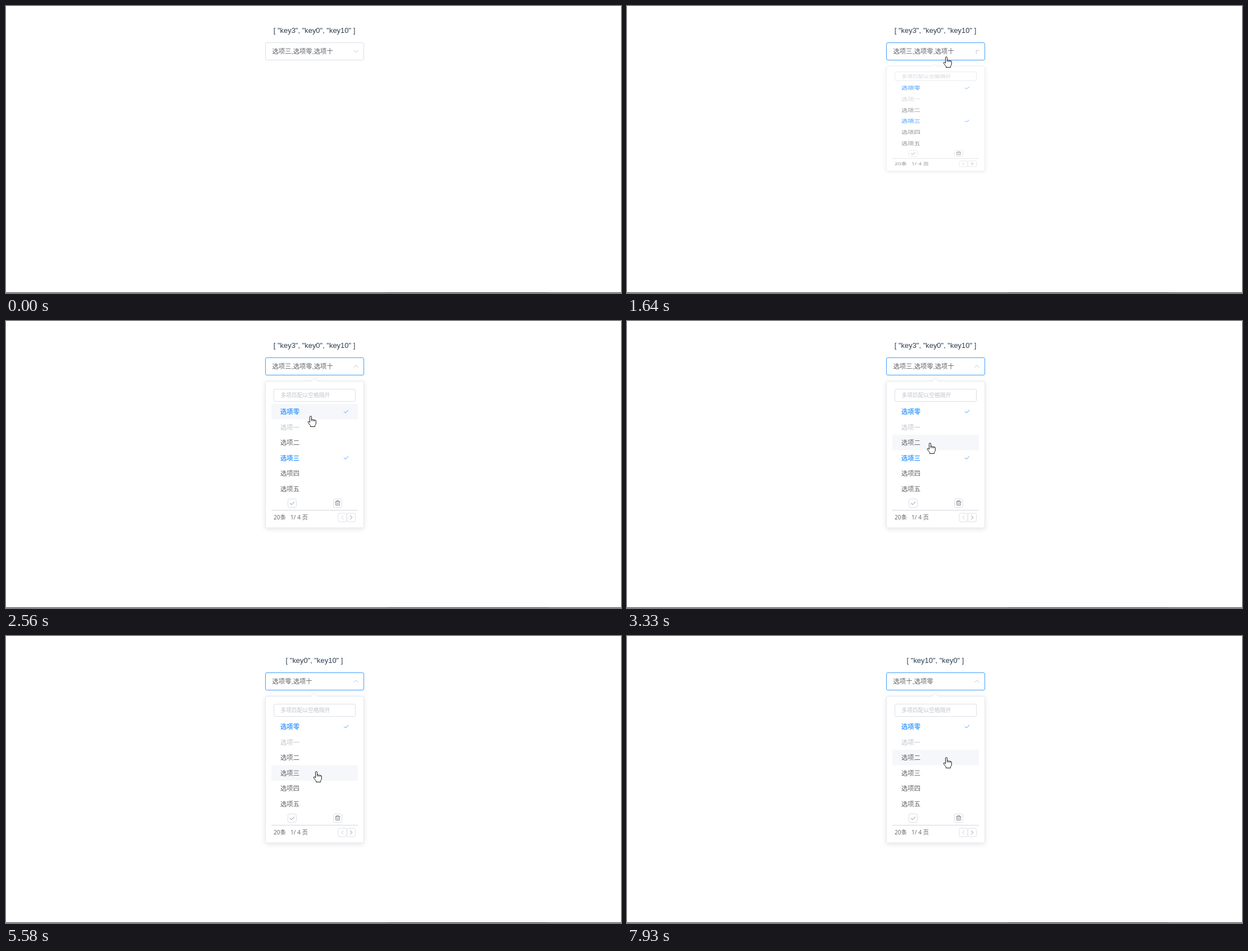
These frames come from a looping animation (1094x512 px, 7990 ms). An HTML page:

```html
<!DOCTYPE html>
<html lang="zh-CN">
<head>
<meta charset="utf-8">
<style>
html, body { margin: 0; width: 100%; height: 100%; overflow: hidden; background: #fff; }
svg { display: block; font: 11.33px Arial, "Liberation Sans", "Noto Sans CJK SC", "Noto Sans CJK", sans-serif; fill: #606266; }
path { fill: none; }
#keys { font-size: 12.94px; fill: #2c3e50; text-anchor: middle; }
.box { fill: #fff; stroke: #dcdfe6; rx: 2.5px; }
.faint { stroke: #c0c4cc; }
.icon { stroke: #808389; }
.page { font: 10.2px "Open Sans", "Noto Sans CJK SC", "Noto Sans CJK", sans-serif; }
.off text { fill: #c0c4cc; }
.on text { fill: #409eff; font-weight: 700; }
.on use { stroke: #409eff; }
#panel { transform-origin: 548.5px 107px; filter: drop-shadow(0 2px 4px rgba(0,0,0,.1)); }
#cursors path { fill: #fff; stroke: #000; stroke-width: .9; stroke-linejoin: round; }
</style>
</head>
<body>
<svg width="1094" height="512" viewBox="0 0 1094 512">
  <defs>
    <clipPath id="clip"><path d="M470 66h142v30h-142z"/></clipPath>
    <path id="tick" d="M-4 0l2.8 2.8 5.2-5.2"/>
    <path id="caret" d="M-4-2l4 4 4-4"/>
  </defs>
  <text id="keys" x="548.5" y="48"></text>
  <rect id="select" class="box" x="461.5" y="65.5" width="175" height="31"/>
  <text id="value" x="473.5" y="85" clip-path="url(#clip)"></text>
  <use id="chevron" href="#caret" class="faint"/>

  <g id="panel">
    <rect class="box" x="461.5" y="107.5" width="175" height="261.5" style="stroke:#e4e7ed"/>
    <path d="M543 108l5.5-5 5.5 5" style="fill:#fff" stroke="#ebeef5"/>
    <rect class="box" x="476.5" y="121.5" width="145" height="22"/>
    <text x="488.5" y="136" font-size="9.75" fill="#c0c4cc">多项匹配以空格隔开</text>
    <rect id="hover" x="472" width="154" height="27.5" fill="#f5f7fa"/>
    <g id="rows"></g>
    <g id="buttons"></g>
    <use href="#tick" class="icon" x="509" y="325"/>
    <path class="icon" d="M585.5 322.5h9M588 322v-1.5h4v1.5M586.7 322.5v6h6.6v-6M589 324.5v2.5M591 324.5v2.5"/>
    <path d="M472 337.5h154" stroke="#d3d6dc"/>
    <text class="page" x="476" y="354">20条</text>
    <text class="page" x="506" y="354">1/ 4 页</text>
    <use href="#caret" class="faint" transform="translate(598.5 350.5) rotate(90) scale(.9)"/>
    <use href="#caret" class="icon" transform="translate(614 350.5) rotate(-90) scale(.9)"/>
  </g>

  <rect y="511" width="1094" height="1" fill="#33383b"/>
  <rect x="678" y="511" width="286" height="1" fill="#222527"/>

  <g id="cursors">
    <circle id="press" r="10" fill="#ff0" opacity=".5"/>
    <path id="hand" d="M-1.5 11V1.2a1.5 1.5 0 0 1 3 0V6q1.4-1 2.7.3 1.5-.8 2.7.5 2-.6 2.5 1.2V12q-.2 3-1.8 4.3v2.2H-.5v-2L-4.6 11.4Q-5.4 9-3.4 9.2ZM1.5 6v2.5m2.7-2v2.5m2.7-2v2"/>
    <path id="arrow" d="M0 0v15l3.5-3.3 2.4 5.3 2.2-1-2.4-5.1h4.8z"/>
    <path id="beam" d="M-3-8h6M0-8V8M-3 8h6"/>
    <path id="stop" d="M-8 0a8 8 0 1 0 16 0a8 8 0 1 0-16 0M-5.5-5.5l11 11"/>
  </g>
</svg>
<script>
const LOOP = 7990, ENTER = 170, OPEN = 1560, HOLD = 80, TOP = 148, PITCH = 27.5;
const digits = [...'零一二三四五六七八九十'];
const moves = [
  { from: ENTER, to: 960, x: 568, y: 91 },
  { from: 2030, to: 2560, x: 542, y: 170 },
  { from: 2720, to: 3330, x: 539, y: 218 },
  { from: 5130, to: 5350, x: 552, y: 242 },
  { from: 6060, to: 6510, x: 590, y: 162 },
  { from: 7370, to: 7900, x: 568, y: 217 }
];
// each click toggles one option; the first only opens the list
const clicks = [
  { at: OPEN }, { at: 4190, key: 2 }, { at: 4970, key: 2 },
  { at: 5580, key: 3 }, { at: 6660, key: 0 }, { at: 7370, key: 0 }
];

const $ = id => document.getElementById(id);
const clamp = u => Math.min(1, Math.max(0, u));
const show = (el, on) => el.setAttribute('visibility', on ? 'inherit' : 'hidden');
const button = (x, y) => `<rect class="box" x="${x}" y="${y}" width="15" height="15"/>`;

$('rows').innerHTML = digits.slice(0, 6).map((d, i) => {
  const y = TOP + PITCH * i;
  return `<g class="${i === 1 ? 'off' : ''}"><text x="488" y="${y + 18}">选项${d}</text>` +
    `<use href="#tick" x="605" y="${y + 13.3}"/></g>`;
}).join('');
$('buttons').innerHTML =
  button(501.5, 317.5) + button(582.5, 317.5) + button(591, 343) + button(606.5, 343);

function pointer(t) {
  let x = 938, y = 458;
  for (const m of moves) {
    const u = clamp((t - m.from) / (m.to - m.from)), e = u * u * (3 - 2 * u);
    x += (m.x - x) * e;
    y += (m.y - y) * e;
  }
  return [x, y];
}

function selection(t) {
  let keys = [3, 0, 10];
  for (const { at, key } of clicks) {
    if (key === undefined || at > t) continue;
    keys = keys.includes(key) ? keys.filter(k => k !== key) : [...keys, key];
  }
  return keys;
}

function cursorKind(y, open, row) {
  if (y > 65 && y < 97) return 'hand';
  if (!open) return 'arrow';
  if (y > 121 && y < 144) return 'beam';
  if (row === 1) return 'stop';
  return row >= 0 && row < 6 ? 'hand' : 'arrow';
}

function draw(t) {
  const [x, y] = pointer(t), keys = selection(t);
  const open = t >= OPEN, grow = 1 - (1 - clamp((t - OPEN) / 300)) ** 4;
  const row = open ? Math.floor((y - TOP) / PITCH) : -1;
  const kind = cursorKind(y, open, row);

  $('keys').textContent = `[ ${keys.map(k => `"key${k}"`).join(', ')} ]`;
  $('value').textContent = keys.map(k => '选项' + digits[k]).join(',');
  $('select').style.stroke = open ? '#409eff' : kind === 'hand' ? '#c0c4cc' : '#dcdfe6';
  $('chevron').setAttribute('transform', `translate(622.5 80.8) rotate(${180 * grow})`);

  show($('panel'), open);
  $('panel').style.transform = `scaleY(${grow})`;
  $('panel').style.opacity = grow;
  show($('hover'), open && kind === 'hand' && row >= 0);
  $('hover').setAttribute('y', TOP + PITCH * row);
  [...$('rows').children].forEach((g, i) => g.classList.toggle('on', keys.includes(i)));

  $('cursors').setAttribute('transform', `translate(${x} ${y})`);
  for (const id of ['hand', 'arrow', 'beam', 'stop']) show($(id), t >= ENTER && id === kind);
  show($('press'), clicks.some(({ at }) => t >= at - HOLD && t < at));
}

const start = performance.now();
(function tick() {
  draw((performance.now() - start) % LOOP);
  requestAnimationFrame(tick);
})();
</script>
</body>
</html>
```
